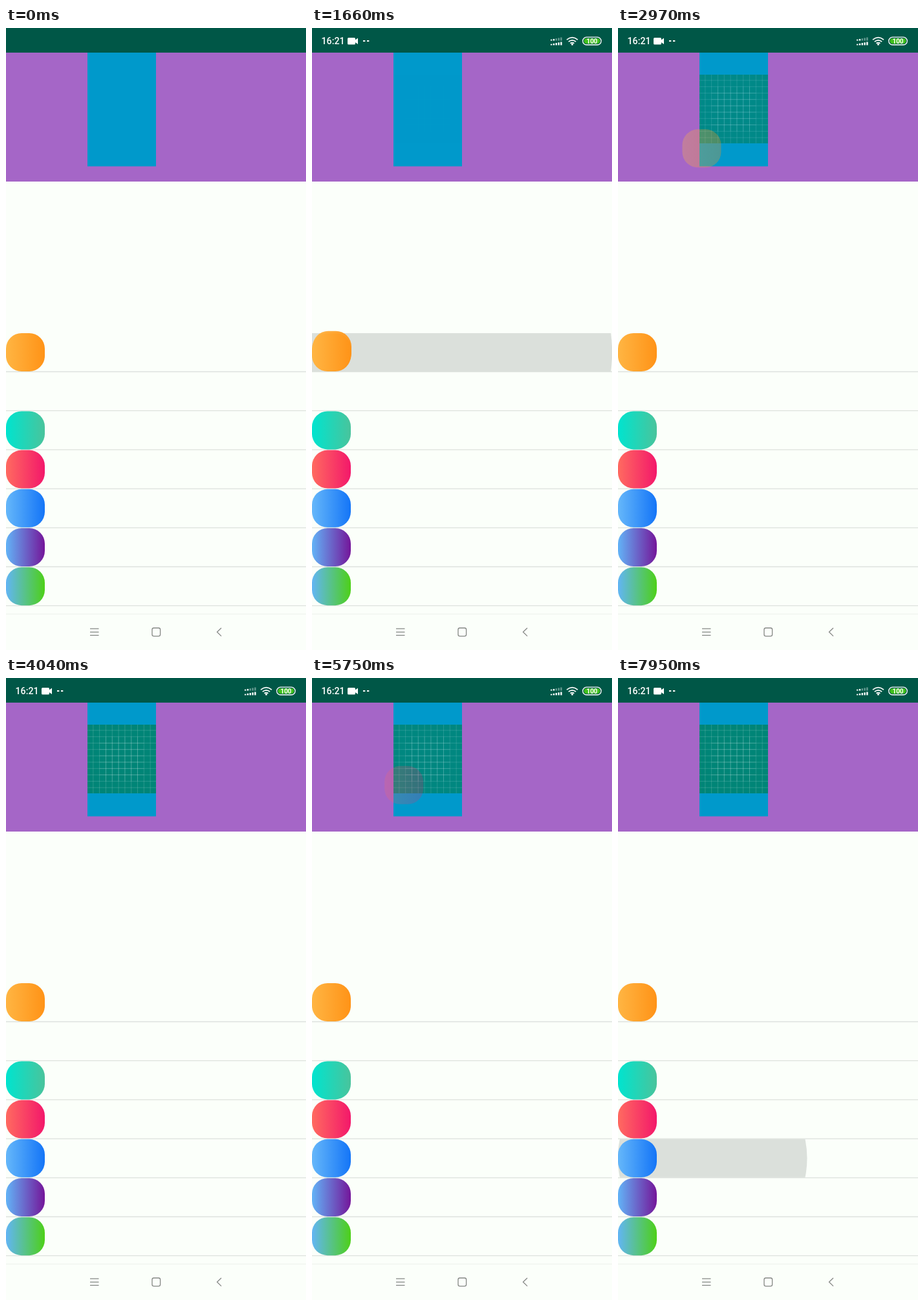
Recreate the animation shown at these times as an HTML page. Size 464x960 px, loop 8000 ms.

```html
<!DOCTYPE html>
<html lang="en">
<head>
<meta charset="utf-8">
<title>Flying list icons</title>
<style>
  html, body { margin: 0; width: 100%; height: 100%; overflow: hidden; background: #fbfffa; }
  svg { display: block; }
  text { font-family: Roboto, sans-serif; fill: #fff; }
</style>
</head>
<body>
<svg id="stage" width="464" height="960" viewBox="0 0 464 960">
  <defs id="defs"></defs>
  <rect width="464" height="960" fill="#fbfffa"/>
  <rect y="38" width="464" height="199" fill="#a566c7"/>
  <rect x="126" y="38" width="106" height="175.5" fill="#0099cb"/>
  <g id="grid" transform="translate(126 72) scale(.9815)" opacity="0">
    <rect width="108" height="108" fill="#008577"/>
    <path id="gridLines" fill="none" stroke="#fff" stroke-opacity=".2" stroke-width=".8"/>
  </g>

  <rect width="464" height="38" fill="#005747"/>
  <g id="status" fill="#fff">
    <text x="14.5" y="25.4" font-size="14.2" font-weight="500">16:21</text>
    <rect x="55" y="15" width="12" height="10.5" rx="1.5"/>
    <path d="M66 19l5-3.5v9.5l-5-3.5zM79 19h3.3v2h-3.3zM85 19h3.3v2h-3.3z"/>
    <g id="signal"></g>
    <g fill="none" stroke="#fff" stroke-width="1.7">
      <path d="M394 18.2q8.500-7 17 0M396.800 21.100q5.700-4.600 11.400 0M399.500 23.700q3-2.200 6 0"/>
    </g>
    <circle cx="402.500" cy="25.200" r="1.500"/>
    <rect x="418.700" y="14.200" width="28.600" height="11.800" rx="5.900" fill="none" stroke="#fff" stroke-width="1.300"/>
    <rect x="420.600" y="16" width="24.800" height="8.200" rx="4.100" fill="#3fc01c"/>
    <text x="433" y="23.700" font-size="10" font-weight="700" text-anchor="middle">100</text>
  </g>

  <g id="list"></g>
  <circle id="ripple" fill="#dbe0db" clip-path="url(#rowClip)"/>
  <g id="icons"></g>
  <rect id="flyer" width="60" height="59" rx="24"/>

  <path d="M0 904.5H464" stroke="#edf1ed"/>
  <g fill="none" stroke="#858885" stroke-width="1.3">
    <path d="M130 927.2h13.500M130 932.300h13.500M130 937.400h13.500M333 926l-6.500 6.300 6.500 6.300"/>
    <rect x="226" y="926" width="12.600" height="12.600" rx="2.600"/>
  </g>
</svg>
<script>
const LOOP = 8000;
const TARGET = { x: 126, y: 72.5 };
const RIPPLE = { touchX: 139, startRadius: 139, endX: 232, endRadius: 234, enter: 225, exit: 150 };

// Left and right colour of every row's icon; the second row is blank.
const ROWS = [
  ['#ffb543', '#ff9317'], null, ['#00e4cf', '#49c49c'], ['#ff6a60', '#f3186a'],
  ['#65b7fa', '#1475f7'], ['#62b3f7', '#74169a'], ['#62b5f5', '#4dd018']
];
const TAPS = [
  { row: 0, ripple: 1496, fly: 1543, duration: 2050 },
  { row: 3, ripple: 4050, fly: 4086, duration: 2120 },
  { row: 4, ripple: 7948, fly: LOOP, duration: 2050 }
];

const $ = id => document.getElementById(id);
const rowTop = row => 471 + row * 60.2;
const mix = (a, b, f) => a + (b - a) * f;
const clamp = v => Math.min(1, Math.max(0, v));
const easeInOut = t => (1 - Math.cos(Math.PI * t)) / 2;
const logDecelerate = t => (1 - 400 ** -t) / (1 - 1 / 400);

function set(el, attributes) {
  for (const name in attributes) el.setAttribute(name, attributes[name]);
}

function build() {
  let defs = `<clipPath id="rowClip"><rect id="rowClipRect" width="464" height="59"/></clipPath>`;
  let lines = '', icons = '', bars = '', grid = '';
  ROWS.forEach((colors, row) => {
    const y = rowTop(row);
    lines += `<path d="M0 ${y + 59.5}H464" stroke="#dde1dd" stroke-width="1.3"/>`;
    if (!colors) return;
    defs += `<linearGradient id="fill${row}"><stop stop-color="${colors[0]}"/>` +
      `<stop offset="1" stop-color="${colors[1]}"/></linearGradient>`;
    icons += `<rect y="${y}" width="60" height="59" rx="24" fill="url(#fill${row})"/>`;
  });
  for (let i = 0; i < 5; i++) {
    const x = 369 + i * 3.8, h = 1.8 + i * 0.8;
    bars += `<rect x="${x}" y="${19.5 - h}" width="2.4" height="${h}" opacity="${i < 2 ? 1 : 0.4}"/>` +
      `<rect x="${x}" y="${26.5 - h}" width="2.4" height="${h}"/>`;
  }
  for (let p = 9; p < 108; p += 10) {
    grid += `M${p} 0V108M0 ${p}H108`;
    if (p > 20 && p < 80) grid += `M${p} 19V89M19 ${p}H89`;
  }
  $('defs').innerHTML = defs;
  $('list').innerHTML = lines;
  $('icons').innerHTML = icons;
  $('signal').innerHTML = bars;
  // Separate strokes let the overlapping inner lines appear brighter.
  const [first, ...rest] = grid.split('M').slice(1).map(d => 'M' + d);
  set($('gridLines'), { d: first });
  rest.forEach(d => {
    const line = $('gridLines').cloneNode();
    line.removeAttribute('id');
    set(line, { d });
    $('grid').append(line);
  });
}

function drawRipple(time, tap) {
  const elapsed = tap ? time - tap.ripple : -1;
  if (elapsed < 0) return set($('ripple'), { opacity: 0 });
  const f = logDecelerate(clamp(elapsed / RIPPLE.enter));
  set($('rowClipRect'), { y: rowTop(tap.row) });
  set($('ripple'), {
    cx: mix(RIPPLE.touchX, RIPPLE.endX, f),
    cy: rowTop(tap.row) + 29.5,
    r: mix(RIPPLE.startRadius, RIPPLE.endRadius, f),
    opacity: 1 - clamp((elapsed - RIPPLE.enter) / RIPPLE.exit)
  });
}

function drawFlight(time, tap) {
  const t = tap ? clamp((time - tap.fly) / tap.duration) : 0;
  const p = easeInOut(t);
  set($('grid'), { opacity: p });
  set($('flyer'), { opacity: tap ? 1 - t : 0 });
  if (tap) set($('flyer'), {
    x: mix(0, TARGET.x, p),
    y: mix(rowTop(tap.row), TARGET.y, p),
    fill: `url(#fill${tap.row})`
  });
}

function draw(now) {
  const time = now % LOOP;
  set($('status'), { opacity: time < 40 ? 0 : 1 });
  drawRipple(time, TAPS.findLast(tap => time >= tap.ripple));
  drawFlight(time, TAPS.findLast(tap => time >= tap.fly));
}

build();
const start = performance.now();
function tick() {
  draw(performance.now() - start);
  requestAnimationFrame(tick);
}
tick();
</script>
</body>
</html>
```
